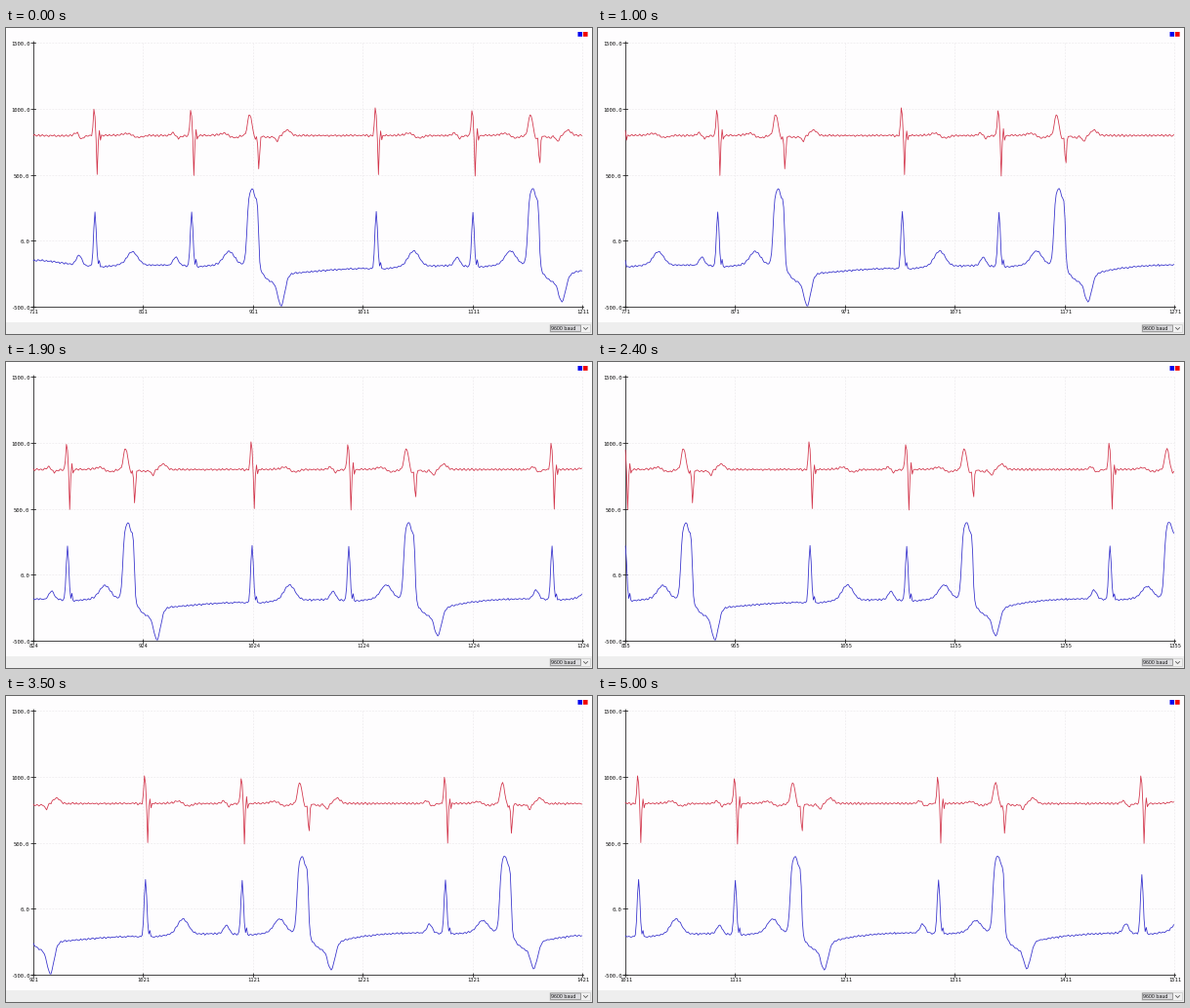
Animation, 600 px wide and 314 px high, one loop 5.1 s. Source, as a matplotlib script:

```python
import numpy as np
import matplotlib.pyplot as plt
from matplotlib.animation import FuncAnimation
from matplotlib.patches import Rectangle

W, H, DPI = 600, 314, 100
FRAMES, INTERVAL = 51, 100
PX = 72 / DPI                       # points per pixel
LEFT, TOP, BOTTOM = 28.5, 15.5, 286.5
STEP = 1.125                        # pixels per sample
SPAN, FIRST, LAST = 500, 711, 1511

# Scroll position: (frame, first visible sample)
SCROLL = [(0, 711), (10, 771), (19, 824), (29, 886), (35, 921), (42, 964), (50, 1011)]

# Narrow beats: sample, heights of the P, R and T waves
BEATS = [(767, 10, 56, 13.5), (855, 8.5, 56, 14), (1023, 0, 60, 16),
         (1111, 8.5, 55, 14.5), (1296, 9, 56, 12), (1481, 9.5, 61, 12.5)]

# Wide beats: sample, trough depth, slope dip, recovery time
WIDE_BEATS = [(910, 23, 35, 70), (1165.5, 19, 31, 25), (1350, 18, 32, 35)]


def bell(x, width):
    return np.exp(-(x / width) ** 2)


def ramp(x, width):
    return 1 / (1 + np.exp(-np.clip(x / width, -50, 50)))


def narrow_spike(off, r):
    """Fast part of a narrow beat, in the lower and the upper trace."""
    low = -r * bell(off, 1.7) - 7 * bell(off - 4, 0.6)
    high = (-0.5 * r * bell(off + 0.7, 1.2) + 41 * bell(off - 2, 0.75)
            - 6 * bell(off - 4, 0.6) + 5 * bell(off - 5, 0.6))
    return low, high


def wide_wave(off, trough, dip, recovery):
    """Tall plateau, sagging shoulder, trough and slow return."""
    after = np.maximum(off - 6, 0)
    plateau = (78 - 10 * ramp(off - 2, 0.4)) * ramp(off + 4.6, 0.85) * ramp(5.9 - off, 0.45)
    sag = 20 * (1 - np.exp(-after / 6))
    tail = 9 * np.exp(-(off - 35).clip(0) / recovery)
    low = sag + (tail - sag) * ramp(off - 32, 1.2) + trough * bell(off - 26.3, 3.8) - plateau
    high = (-22 * bell(off + 2.2, 2.6) + 5 * bell(off - 3, 1) + dip * bell(off - 6.2, 1)
            + 2 * bell(off - 15, 5) + 6 * bell(off - 22.7, 2) - 5.5 * bell(off - 32, 4))
    return low, high


def make_traces():
    s = np.arange(FIRST, LAST + 1)
    low = np.linspace(243.5, 242, len(s)) - 5 * bell(s - FIRST - 4, 25)
    for pos, p, r, t in BEATS:
        off = s - pos
        low += 1.8 * bell(off - 4, 12) - p * bell(off + 14.5, 3.4) - t * bell(off - 34, 7)
    # The upper trace follows the slope of the slow waves
    high = 110.3 + 1.25 * np.gradient(low)

    waves = [narrow_spike(s - pos, r) for pos, _, r, _ in BEATS]
    waves += [wide_wave(s - pos, *shape) for pos, *shape in WIDE_BEATS]
    for low_wave, high_wave in waves:
        low += low_wave
        high += high_wave

    rng = np.random.default_rng(4)
    hum = np.sin(2 * np.pi * s / 3.6)
    low += 0.6 * hum + rng.normal(0, 0.25, len(s))
    high += 0.8 * hum + rng.normal(0, 0.25, len(s))
    return low, high


fig = plt.figure(figsize=(W / DPI, H / DPI), dpi=DPI, facecolor="#fefdfe")
ax = fig.add_axes([0, 0, 1, 1])
ax.set_xlim(0, W)
ax.set_ylim(H, 0)
ax.axis("off")


def line(xs, ys, color, width=0.8, **kw):
    return ax.plot(xs, ys, color=color, lw=width * PX, snap=False, **kw)[0]


def box(x, y, w, h, face, edge="none"):
    ax.add_patch(Rectangle((x, y), w, h, fc=face, ec=edge, lw=0.8 * PX,
                           zorder=3, snap=False))


def label(x, y, text, size=5.5, font="DejaVu Sans Mono", **kw):
    return ax.text(x, y, text, fontsize=size * PX, family=font, color="#111111",
                   va="center_baseline", zorder=5, **kw)


AXIS = dict(color="#1a1a1a", zorder=2)
GRID = dict(color="#f0eef0", width=0.9, linestyle=(0, (2, 1.5)), zorder=1)
ticks_x = np.ceil(LEFT + 112.5 * np.arange(6)) - 0.5
ticks_y = np.floor(np.linspace(TOP, BOTTOM, 5)) + 0.5
right = ticks_x[-1]

for x in ticks_x[1:]:
    line([x, x], [TOP, BOTTOM], **GRID)
for y in ticks_y[:-1]:
    line([LEFT, right], [y, y], **GRID)

line([LEFT, LEFT], [TOP - 1.5, BOTTOM], **AXIS)
line([26, right + 1], [BOTTOM, BOTTOM], **AXIS)
for i, y in enumerate(ticks_y):
    line([26, 30.5], [y, y], **AXIS)
    label(24.3, y + 0.3, f"{1500 - 500 * i:.1f}", ha="right")
for x in ticks_x:
    line([x, x], [BOTTOM - 1.5, BOTTOM + 2], **AXIS)

box(585.5, 4, 4.6, 4.8, "#0505f0")
box(591, 4, 4.6, 4.8, "#f00505")

box(0, 302, W, 12, "#eeeeee")
box(557, 304.5, 41.5, 8, "#f0f0f0", "#cfcfcf")
box(557.5, 305, 31, 6.5, "#dcdcdf", "#8a8a8a")
label(558.3, 308.4, "9600 baud", 5.3, "Liberation Sans", ha="left")
line([591.5, 593.5, 595.5], [307.5, 309.5, 307.5], "#555555", zorder=5)

low, high = make_traces()
xs = LEFT - 0.4 + STEP * np.arange(SPAN)
low_line = line(xs, low[:SPAN], "#3530cc", zorder=4)
high_line = line(xs, high[:SPAN], "#d2344a", zorder=4)
counters = [label(x, 291.4, "", ha="center") for x in ticks_x]


def update(frame):
    start = int(round(np.interp(frame, *zip(*SCROLL))))
    i = start - FIRST
    low_line.set_ydata(low[i:i + SPAN])
    high_line.set_ydata(high[i:i + SPAN])
    for n, text in enumerate(counters):
        text.set_text(str(start + 100 * n))
    return [low_line, high_line, *counters]


anim = FuncAnimation(fig, update, frames=FRAMES, interval=INTERVAL,
                     repeat=True, repeat_delay=0)
plt.show()
```
